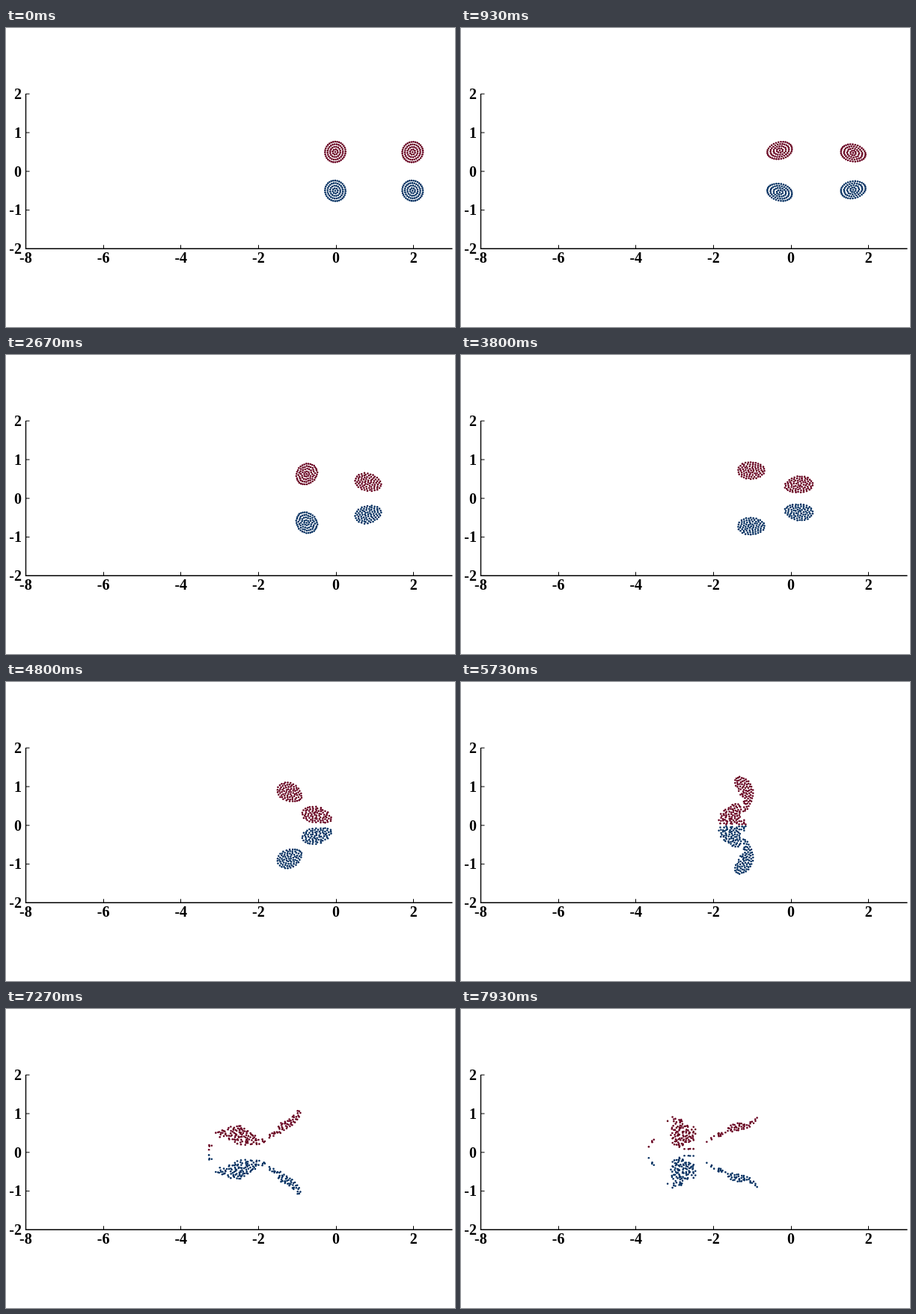
These frames come from a looping animation (600x400 px, 8 s). An HTML page with a canvas:

```html
<!DOCTYPE html>
<html lang="en">
<head>
<meta charset="utf-8">
<title>Leapfrogging vortex pairs</title>
<style>
  html, body { margin: 0; width: 100%; height: 100%; overflow: hidden; background: #fff; }
  canvas { display: block; }
</style>
</head>
<body>
<canvas id="stage" width="600" height="400"></canvas>
<script>
const ctx = document.getElementById('stage').getContext('2d');

const LOOP = 8000, FRAMES = 120, FRAMES_PER_MS = 0.015;
const SCALE = 51.82, ORIGIN_X = 441, ORIGIN_Y = 191.8;
const toX = x => ORIGIN_X + x * SCALE;
const toY = y => ORIGIN_Y - y * SCALE;

// Simulation: the upper patches are integrated, the lower ones are their mirror image.
const STEP = 0.097, CORE_SQ = 1e-5, RINGS = 4, RADIUS = 0.265, PER_PATCH = 81;
const strength = [];

function makePatch(cx, cy, circulation) {
  const points = [[cx, cy]];
  for (let ring = 1; ring <= RINGS; ring++) {
    const r = RADIUS * ring / RINGS, count = 8 * ring;
    for (let i = 0; i < count; i++) {
      const a = 2 * Math.PI * i / count;
      points.push([cx + r * Math.cos(a), cy + r * Math.sin(a)]);
    }
  }
  points.forEach(() => strength.push(circulation / (2 * Math.PI * PER_PATCH)));
  return points.flat();
}

// State layout: x0, y0, x1, y1, ...
function velocity(p) {
  const v = new Float64Array(p.length);
  for (let i = 0; i < p.length; i += 2) {
    let u = 0, w = 0;
    for (let j = 0; j < p.length; j += 2) {
      const g = strength[j / 2];
      const dx = p[i] - p[j], dy = p[i + 1] - p[j + 1], sy = p[i + 1] + p[j + 1];
      const own = g / (dx * dx + dy * dy + CORE_SQ);
      const mirror = g / (dx * dx + sy * sy + CORE_SQ);
      u += dy * own - sy * mirror;
      w += dx * (mirror - own);
    }
    v[i] = u;
    v[i + 1] = w;
  }
  return v;
}

const shifted = (p, v, h) => p.map((c, i) => c + h * v[i]);

function rungeKutta(p) {
  const a = velocity(p);
  const b = velocity(shifted(p, a, STEP / 2));
  const c = velocity(shifted(p, b, STEP / 2));
  const d = velocity(shifted(p, c, STEP));
  return p.map((q, i) => q + STEP / 6 * (a[i] + 2 * b[i] + 2 * c[i] + d[i]));
}

const states = [];
let state = Float64Array.from([...makePatch(0, 0.5, 1), ...makePatch(2, 0.5, 1.5)]);
for (let i = 0; i < FRAMES; i++) states.push(state = rungeKutta(state));

function line(x1, y1, x2, y2, width) {
  ctx.lineWidth = width;
  ctx.beginPath();
  ctx.moveTo(x1, y1);
  ctx.lineTo(x2, y2);
  ctx.stroke();
}

function drawAxes() {
  const left = 26.5, right = 596.5, top = 88, bottom = 295.3;
  ctx.strokeStyle = ctx.fillStyle = '#000';
  ctx.font = 'bold 20px "Liberation Serif", serif';
  line(left, top, left, bottom + 0.7, 1.4);
  line(left, bottom, right, bottom, 1.4);
  ctx.textAlign = 'center';
  for (let x = -8; x <= 2; x += 2) {
    const px = Math.floor(toX(x)) + 0.5;
    line(px, bottom, px, bottom - 5, 1);
    ctx.fillText(x, toX(x), 314);
  }
  ctx.textAlign = 'right';
  for (let y = -2; y <= 2; y++) {
    line(left, toY(y), left + 5, toY(y), 1);
    ctx.fillText(y, 21, Math.round(toY(y) + 6.7));
  }
}

function drawDots(points, sign, color) {
  ctx.fillStyle = color;
  for (let i = 0; i < points.length; i += 2) {
    ctx.beginPath();
    ctx.arc(toX(points[i]), toY(sign * points[i + 1]), 1.3, 0, 2 * Math.PI);
    ctx.fill();
  }
}

function draw() {
  const t = performance.now() % LOOP;
  // The small offset absorbs frame times rounded to 10 ms.
  const points = states[Math.floor(t * FRAMES_PER_MS + 0.06) % FRAMES];
  ctx.fillStyle = '#fff';
  ctx.fillRect(0, 0, 600, 400);
  drawAxes();
  drawDots(points, 1, '#67001f');
  drawDots(points, -1, '#053061');
  requestAnimationFrame(draw);
}
draw();
</script>
</body>
</html>
```
